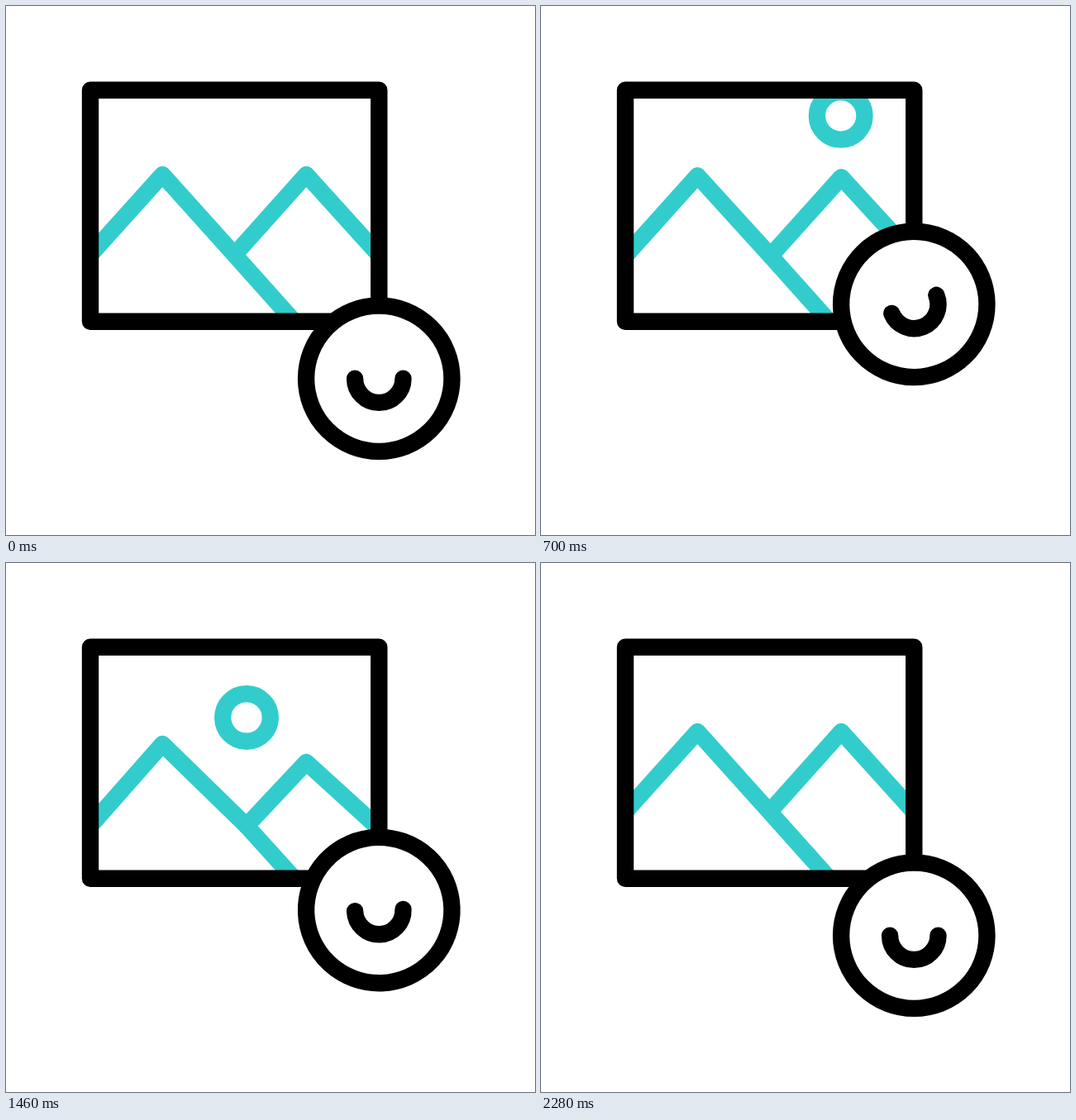
Write an HTML page with a canvas that moves like this. It is 640 px wide and 640 px high and loops after 2400 ms.

```html
<!DOCTYPE html>
<html lang="en">
<head>
<meta charset="utf-8">
<title>Picture and smiley</title>
<style>
html, body { margin: 0; width: 100%; height: 100%; overflow: hidden; background: #fff; }
canvas { display: block; }
</style>
</head>
<body>
<canvas id="stage" width="640" height="640"></canvas>
<script>
const ctx = document.getElementById('stage').getContext('2d');
const LOOP = 2400;
const TEAL = '#33cccc';
const FRAME = { x: 102, y: 101.7, w: 349.3, h: 280.1 };

// Each key is [time, value].
const FACE_LIFT = [[200, 0], [575, -90], [690, -90], [1080, 0], [1100, 0], [1540, -33.5], [2280, 0]];
const FACE_TILT = [[200, 0], [715, -22.3], [1100, 15.6], [1740, -14], [2280, 0]];
const SUN_IN = [[474, 73], [410, 104], [344, 138], [291, 187]];
const SUN_OUT = [[291, 187], [258, 217], [230, 295], [208, 410]];
const SPARKS = [
  { from: [359.2, 510.8], to: [315.5, 530.5] },
  { from: [385.3, 548], to: [369.9, 592] }
];

const mix = (a, b, p) => a + (b - a) * p;
const mixPoint = (a, b, p) => [mix(a[0], b[0], p), mix(a[1], b[1], p)];

function ease(t, start, end) {
  const u = Math.min(1, Math.max(0, (t - start) / (end - start)));
  return u * u * (3 - 2 * u);
}

function track(keys, t) {
  let value = keys[0][1];
  for (let i = 1; i < keys.length; i++) {
    value += (keys[i][1] - keys[i - 1][1]) * ease(t, keys[i - 1][0], keys[i][0]);
  }
  return value;
}

function bezier([a, b, c, d], p) {
  const q = 1 - p;
  return [0, 1].map(k =>
    q * q * q * a[k] + 3 * q * q * p * b[k] + 3 * q * p * p * c[k] + p * p * p * d[k]);
}

function polyline(points) {
  ctx.beginPath();
  points.forEach(([x, y]) => ctx.lineTo(x, y));
}

function strokeLine(points, color) {
  polyline(points);
  ctx.strokeStyle = color;
  ctx.stroke();
}

function ring(x, y, r, color) {
  ctx.beginPath();
  ctx.arc(x, y, r, 0, Math.PI * 2);
  ctx.fillStyle = '#fff';
  ctx.fill();
  ctx.strokeStyle = color;
  ctx.stroke();
}

function drawLandscape(t) {
  ctx.save();
  ctx.beginPath();
  ctx.rect(FRAME.x, FRAME.y, FRAME.w, FRAME.h);
  ctx.clip();

  const [sunX, sunY] = t < 1300
    ? bezier(SUN_IN, ease(t, 200, 1100))
    : bezier(SUN_OUT, ease(t, 1480, 2280));
  ring(sunX, sunY, 28.8, TEAL);

  const sink = ease(t, 615, 1100) - ease(t, 1600, 2280);
  const left = [102, mix(301, 318, sink)];
  const peakA = [189.3, mix(204, 219, sink)];
  const valley = mixPoint([276.5, 301], [291, 318], sink);
  const peakB = [363.3, mix(204, 241, sink)];
  const right = [451, mix(301, 321, sink)];
  const foot = [349, 382];

  polyline([left, peakA, valley, peakB, right, [451, 382], [102, 382]]);
  ctx.fillStyle = '#fff';
  ctx.fill();
  strokeLine([left, peakA, valley, foot], TEAL);
  strokeLine([valley, peakB, right], TEAL);
  ctx.restore();

  ctx.strokeStyle = '#000';
  ctx.strokeRect(FRAME.x, FRAME.y, FRAME.w, FRAME.h);
}

function drawSparks(t) {
  const tip = ease(t, 1660, 2020);
  const tail = ease(t, 1780, 2140);
  if (tip - tail < 0.01) return;
  for (const { from, to } of SPARKS) {
    strokeLine([mixPoint(from, to, tail), mixPoint(from, to, tip)], TEAL);
  }
}

function drawFace(t) {
  ctx.save();
  ctx.translate(451.3, 450.7 + track(FACE_LIFT, t));
  ctx.rotate(track(FACE_TILT, t) * Math.PI / 180);
  ring(0, 0, 88.2, '#000');
  ctx.beginPath();
  ctx.arc(0, 0, 29.2, 0, Math.PI);
  ctx.stroke();
  ctx.restore();
}

function draw(now) {
  const t = now % LOOP;
  ctx.fillStyle = '#fff';
  ctx.fillRect(0, 0, 640, 640);
  ctx.lineWidth = 20.4;
  ctx.lineCap = ctx.lineJoin = 'round';
  drawLandscape(t);
  drawSparks(t);
  drawFace(t);
}

const start = performance.now();
function tick() {
  draw(performance.now() - start);
  requestAnimationFrame(tick);
}
tick();
</script>
</body>
</html>
```
